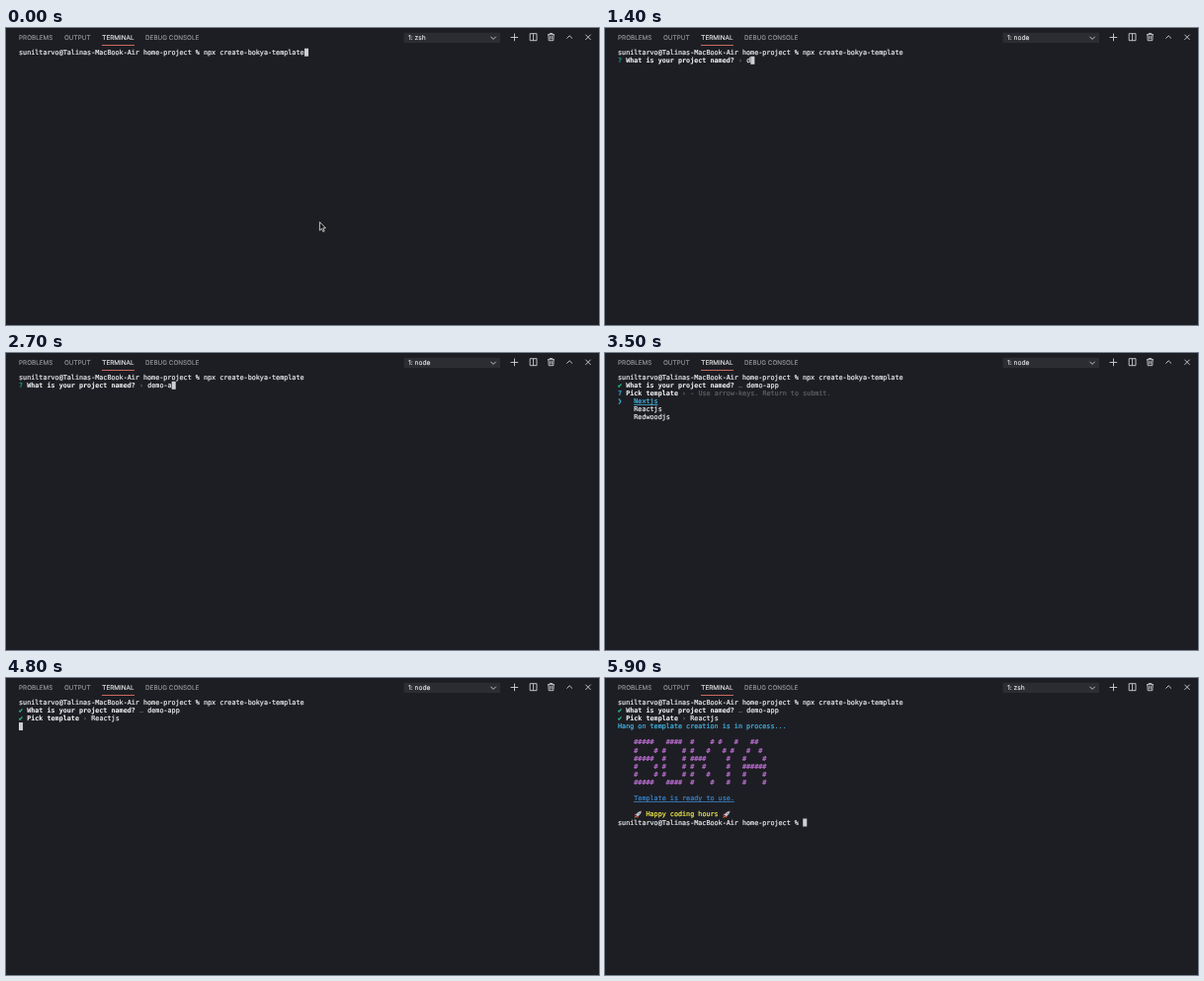
An HTML page that plays this animation: 600x301 px, repeating every 6 s.

```html
<!DOCTYPE html>
<html lang="en">
<head>
<meta charset="utf-8">
<title>Terminal session</title>
<style>
  html, body { margin: 0; width: 100%; height: 100%; overflow: hidden; background: #1d1e23; }
  svg { display: block; }
  text { white-space: pre; text-rendering: geometricPrecision; fill: currentColor; stroke: currentColor; stroke-width: .1; }
  #panel { font: 6.35px Inter, sans-serif; color: #9b9ca0; }
  #panel .active { color: #f2f2f3; }
  #shell { font-size: 6.7px; color: #ececee; }
  #icons { fill: none; stroke: #d2d3d6; stroke-width: .9; }
  #screen { font: 6.76px "DejaVu Sans Mono", monospace; color: #e6e7ea; }
  #screen text { stroke-width: .22; }
  #screen .bold { font-weight: bold; color: #efeff1; stroke-width: .08; }
  #screen .dim { color: #5d5e62; }
  #screen .teal { color: #209d8c; }
  #screen .green { color: #2bc98c; }
  #screen .cyan { color: #41b4e2; }
  #screen .purple { color: #bb70d0; }
  #screen .blue { color: #3a82c8; }
  #screen .yellow { color: #f4ea4c; }
  #screen .link { text-decoration: underline; }
</style>
</head>
<body>
<svg width="600" height="301" viewBox="0 0 600 301">
  <defs>
    <g id="rocket">
      <path d="M2.6 2.8 1 3.4.4 5l1.7-.4M5 5.1 4.5 6.7 3 7.5l.3-1.8" fill="#d0443c"/>
      <path d="M2 4.2Q3.7.9 7.6.3 7.1 4.1 3.6 5.9Z" fill="#c3ccd6"/>
      <path d="M6.1.6 7.6.3 7.3 1.8Z" fill="#d0443c"/>
      <circle cx="5.1" cy="2.8" r=".8" fill="#4d87ae"/>
      <path d="M1.9 4.9.3 7.5 3.1 6Z" fill="#e5843c"/>
    </g>
  </defs>
  <g id="panel">
    <text x="13" y="12.3">PROBLEMS</text>
    <text x="59" y="12.3">OUTPUT</text>
    <text x="97.3" y="12.3" class="active">TERMINAL</text>
    <text x="141" y="12.3">DEBUG CONSOLE</text>
    <path d="M97 17.5h33" stroke="#cc6a5f"/>
    <rect x="402.5" y="4.8" width="97.5" height="10.2" fill="#2c2d32"/>
    <text id="shell" x="407" y="12.2"></text>
  </g>
  <g id="icons">
    <path d="M490.5 8.8l2.6 2.6 2.6-2.6"/>
    <path d="M510.6 9.5h7.6M514.5 5.6v7.6"/>
    <path d="M530.2 5.7h6.8v7h-6.8zM533.6 5.7v7"/>
    <path d="M548 6.7h7M550.2 6.7v-1.2h2.6v1.2M548.8 6.7l.4 6h4.6l.4-6M550.7 8.1v3.3M552.3 8.1v3.3"/>
    <path d="M567.4 10.6l2.8-2.8 2.8 2.8"/>
    <path d="M586.4 6.7l5.2 5.2M591.6 6.7l-5.2 5.2"/>
  </g>
  <g id="screen"></g>
  <path id="pointer" d="M317.4 196.6v8.6l2-1.9 1.4 3.1 1.4-.6-1.4-3h2.6z" fill="#111" stroke="#eee" stroke-width=".8"/>
</svg>
<script>
const LOOP = 6000, LEFT = 13, TOP = 20.7, CELL_W = 4.07, ROW_H = 8.12;
const PROMPT = 'suniltarvo@Talinas-MacBook-Air home-project % ';
const COMMAND = 'npx create-bokya-template';
const ANSWER = 'demo-app';
const KEY_TIMES = [1400, 1600, 1800, 2000, 2500, 2700, 2900, 3100];
const REDRAWS = [1900, 2800];
const BANNER = [
  '#####   ####  #    # #   #   ##',
  '#    # #    # #   #   # #   #  #',
  '#####  #    # ####     #   #    #',
  '#    # #    # #  #     #   ######',
  '#    # #    # #   #    #   #    #',
  '#####   ####  #    #   #   #    #'
];
const byId = id => document.getElementById(id);
const screenEl = byId('screen'), shell = byId('shell'), pointer = byId('pointer');

const colX = col => LEFT + col * CELL_W;
const rowY = row => TOP + row * ROW_H;
const put = (row, col, text, style = '') =>
  `<text x="${colX(col)}" y="${rowY(row) + 6.1}" class="${style}">${text}</text>`;
const cursor = (row, col) =>
  `<rect x="${colX(col)}" y="${rowY(row)}" width="${CELL_W}" height="8" fill="#cdcfd3"/>`;
const rocket = (row, col) => `<use href="#rocket" x="${colX(col)}" y="${rowY(row)}"/>`;

const question = (row, text, done) =>
  put(row, 0, done ? '✔' : '?', done ? 'green' : row === 1 ? 'teal' : 'cyan') +
  put(row, 2, text, 'bold') +
  put(row, text.length + 3, done && row === 1 ? '…' : '›', 'dim');

function nameStep(t) {
  if (t < 800) return cursor(1, 0);
  const typed = KEY_TIMES.filter(k => k <= t).length;
  const caret = t < 900 ? '' : cursor(1, 32 + typed);
  if (REDRAWS.some(r => t >= r && t < r + 100)) return caret;
  return question(1, 'What is your project named?', false) +
    put(1, 32, ANSWER.slice(0, typed)) + caret;
}

function pickStep(t) {
  const selected = t < 4500 ? 0 : 1;
  return question(2, 'Pick template', false) +
    put(2, 18, '- Use arrow-keys. Return to submit.', 'dim') +
    put(3 + selected, 0, '❯', 'cyan') +
    ['Nextjs', 'Reactjs', 'Redwoodjs'].map((name, i) =>
      put(3 + i, 4, name, i === selected ? 'cyan link' : '')).join('');
}

function resultStep() {
  return put(3, 0, 'Hang on template creation is in process...', 'cyan') +
    BANNER.map((line, i) => put(5 + i, 4, line, 'purple')).join('') +
    put(12, 4, 'Template is ready to use.', 'blue link') +
    rocket(14, 4) + put(14, 7, 'Happy coding hours', 'yellow') + rocket(14, 26) +
    put(15, 0, PROMPT) + cursor(15, PROMPT.length);
}

function render(t) {
  const command = PROMPT + COMMAND;
  let out = put(0, 0, command);
  if (t < 500) out += cursor(0, command.length);
  else if (t < 3500) out += nameStep(t);
  else {
    out += question(1, 'What is your project named?', true) + put(1, 32, ANSWER);
    if (t < 4800) out += pickStep(t);
    else {
      out += question(2, 'Pick template', true) + put(2, 18, 'Reactjs');
      out += t < 5300 ? cursor(3, 0) : resultStep();
    }
  }
  screenEl.innerHTML = out;
  shell.textContent = t < 600 || t >= 5400 ? '1: zsh' : '1: node';
  pointer.style.display = t < 500 ? '' : 'none';
}

// Everything changes on a 100 ms grid, so redraw only when the tick moves on.
let lastTick = -1;
function frame() {
  const tick = Math.floor(performance.now() % LOOP / 100);
  if (tick !== lastTick) render((lastTick = tick) * 100);
  requestAnimationFrame(frame);
}
frame();
</script>
</body>
</html>
```
